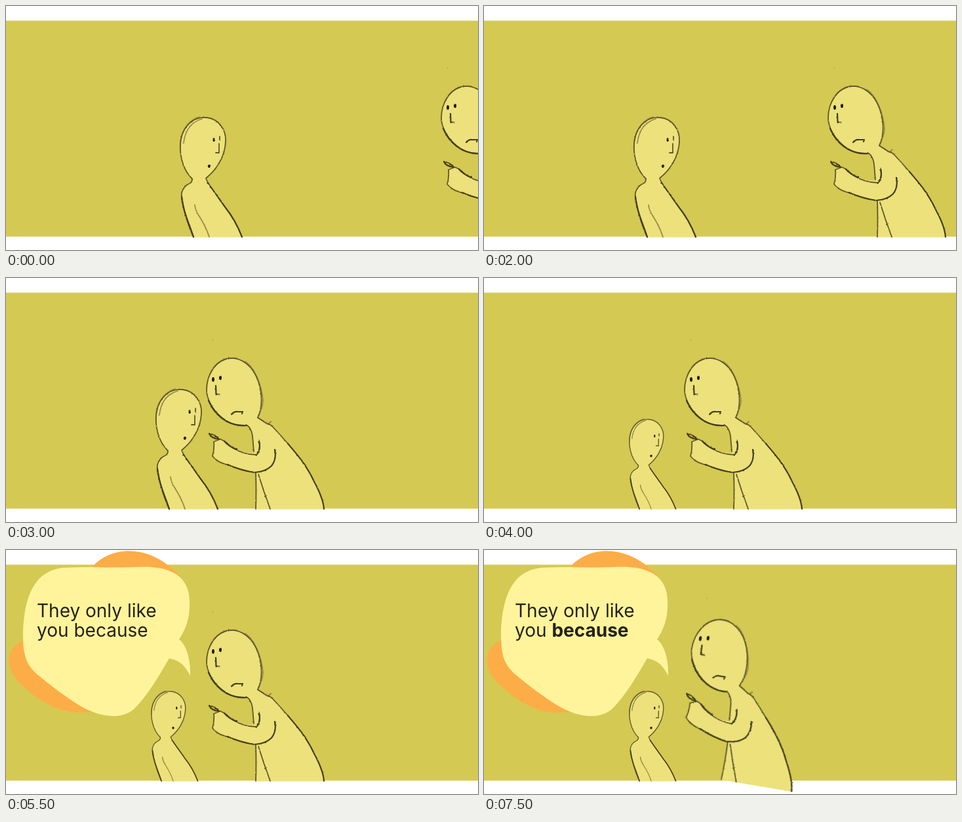
Animation of 720 by 374 pixels, one loop 8 s. Source, as an HTML page:

```html
<!DOCTYPE html>
<html lang="en">
<head>
<meta charset="utf-8">
<title>Talking down</title>
<style>
html, body { margin: 0; width: 100%; height: 100%; overflow: hidden; background: #fff; }
svg { display: block; width: 100vw; height: 100vh; }
.skin { fill: #ece17b; }
.line { fill: none; stroke: #61572a; stroke-width: 1.8; stroke-linecap: round; stroke-linejoin: round; }
.soft { stroke: #988c45; stroke-width: 1.8; }
.bold { stroke: #443c1a; stroke-width: 2.2; }
.ink { fill: #211c08; }
text { font: 28px Inter, "Liberation Sans", sans-serif; fill: #24221a; }
</style>
</head>
<body>
<svg viewBox="0 0 720 374" preserveAspectRatio="none">
  <defs>
    <filter id="pencil" x="-5%" y="-5%" width="110%" height="110%">
      <feTurbulence type="fractalNoise" baseFrequency=".35" numOctaves="2" seed="4"/>
      <feDisplacementMap in="SourceGraphic" scale="2" xChannelSelector="R" yChannelSelector="G"/>
      <feGaussianBlur stdDeviation=".35"/>
    </filter>
  </defs>
  <rect y="22.5" width="720" height="331" fill="#d4c952"/>

  <g id="small">
    <path class="skin" d="M247 265C232 250 226 225 230 204C234 183 250 169 269 171C288 173 299 190 298 208C297 232 283 252 268 264L271 271C282 287 303 312 323 354.5H249C245 337 228 305 231 286Q234 276 243 272Z"/>
    <g filter="url(#pencil)">
      <path class="line soft" d="M234 210C236 192 245 178 262 173M229 218C227 195 240 175 258 170M251 305Q252 314 257 321Q268 338 273 354"/>
      <path class="line" d="M247 265C232 250 226 225 230 204C234 183 250 169 269 171C288 173 299 190 298 208C297 232 283 252 268 264L271 271"/>
      <path class="line" d="M247 265Q247 270 243 272Q234 276 231 286C228 305 245 337 249 354"/>
      <path class="line bold" d="M271 271C282 287 290 298 297 308Q313 328 323 354M231 292Q234 318 249 354"/>
      <path class="line" d="M288 211V225H283M289 200V205"/>
      <ellipse class="ink" cx="280" cy="205" rx="1.5" ry="3"/>
      <ellipse class="ink" cx="273" cy="245.500" rx="2.200" ry="2.500"/>
    </g>
  </g>

  <g id="big">
    <path class="skin" d="M384 214C391 200 392 178 384 156C376 135 360 122 342 123C320 125 306 148 306 172C307 198 335 230 368 226L376 241L378 268Q362 269 345 259L327 247L317 250Q317 262 315 273Q325 284 381 298V354.500H485.500Q484 340 470 312C458 286 442 268 430 254L405 226L395 221Z"/>
    <g filter="url(#pencil)">
      <path class="line soft" d="M311 148C318 129 335 121 352 123M365 128C380 138 390 165 392 188Q391 201 385 211M384 214L399 224L404 220"/>
      <path class="line" d="M384 214C391 200 392 178 384 156C376 135 360 122 342 123C320 125 306 148 306 172C307 198 335 230 368 226"/>
      <path class="line bold" d="M309 188C317 207 336 228 366 226"/>
      <path class="line" d="M368 226Q374 230 376 242L378 266M384 214L398 223L405 226Q418 240 430 254"/>
      <path class="line bold" d="M430 254C442 268 458 286 470 312Q484 338 485 354"/>
      <path class="line" d="M386 249Q389 264 382 271Q363 271 345 260L333 250L327 247L317 251Q318 263 315 273Q322 283 340 287"/>
      <path class="line bold" d="M333 250Q338 257 352 263M338 286Q358 295 379 298Q396 297 405 288Q413 278 410 263M386 250Q389 264 382 271"/>
      <path class="line" d="M381 299Q382 325 381 354M385 301Q393 327 403 354"/>
      <path class="line bold" d="M310 238.500Q319 240 325 247Q313 246 310 238.500Z" fill="#b9ad4a"/>
      <path class="line bold" d="M320 165L320.500 178L326 178.500M344 209Q348 204 353 205L361 205L360 208"/>
      <ellipse class="ink" cx="316" cy="155.500" rx="2" ry="3.500"/>
      <ellipse class="ink" cx="327" cy="153" rx="2" ry="3.200"/>
    </g>
    <circle cx="315.500" cy="95.500" r=".7" fill="#a69a3c"/>
  </g>

  <g id="bubble">
    <path fill="#fdad47" d="M130 28C160 -9 222 -9 265 40ZM27 138C-4 152 -1 184 24 207C50 231 85 257 136 247L40 180Z"/>
    <path fill="#fff49b" d="M26 130C27 88 35 29 92 27C125 25 160 28 200 26C240 24 279 33 280 78C281 105 274 122 264 137C275 145 282 168 281 193C272 174 262 169 249 166C235 190 215 225 195 244C175 261 143 256 115 240C90 225 65 205 48 191C30 175 26 160 26 130Z"/>
    <g id="words">
      <text x="47" y="103">They only like</text>
      <text x="47" y="132.500">you <tspan id="stress">because</tspan></text>
    </g>
  </g>
</svg>
<script>
const LOOP = 8000, STEP = 500;
const el = id => document.getElementById(id);
const at = (list, i) => list[Math.min(i, list.length - 1)];
const show = (id, on) => el(id).setAttribute('visibility', on ? 'visible' : 'hidden');

// One value per half second; the last one holds.
const smallX = [37, 30, 30, 30, 0];
const smallSize = [1, 1, 1, 1, 1, 1, 1, 0.89, 0.75];
const bigX = [358, 300, 300, 219, 219, 43, 0];
// Foot x, foot y, lean in degrees, size
const upright = [485, 355, 0, 1];
const leans = [upright, [473, 363, 4.8, 1], [470, 370.5, 8.7, 1.03], [469, 371, 9.7, 1.045]];

function draw(now) {
  const i = Math.floor(now % LOOP / STEP);
  const [x, y, lean, size] = at(leans, Math.max(0, i - 12));
  el('small').setAttribute('transform',
    `translate(${201 + at(smallX, i)} 354) scale(${at(smallSize, i)}) translate(-201 -354)`);
  el('big').setAttribute('transform',
    `translate(${x + at(bigX, i)} ${y}) rotate(${lean}) scale(${size}) translate(-485 -355)`);
  show('bubble', i >= 9);
  show('words', i >= 10);
  el('stress').setAttribute('font-weight', i >= 14 ? 'bold' : 'normal');
}

const start = performance.now();
function tick() {
  draw(performance.now() - start);
  requestAnimationFrame(tick);
}
tick();
</script>
</body>
</html>
```
